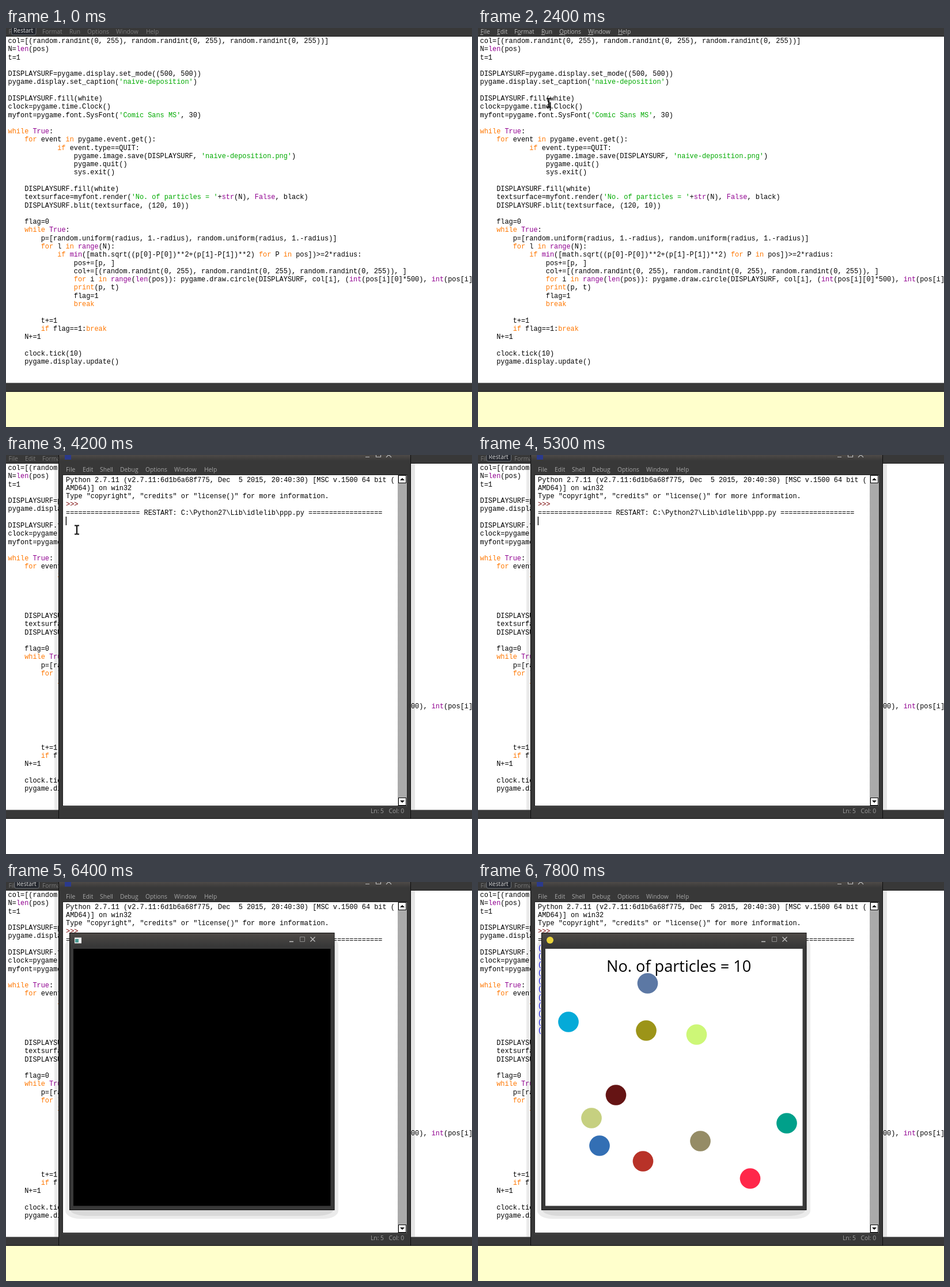
An HTML page that plays this animation: 809x693 px, repeating every 8 s.

```html
<!DOCTYPE html>
<html lang="en">
<head>
<meta charset="utf-8">
<title>Naive deposition</title>
<style>
html, body { margin: 0; width: 100%; height: 100%; overflow: hidden; background: #fff; }
svg { display: block; width: 100vw; height: 100vh; }
text { white-space: pre; }
.code { font: 11.9px "Liberation Mono", "Courier New", monospace; fill: #000; }
.ui { font: 10.3px "Open Sans", "Noto Sans", sans-serif; }
.key { fill: #ff7700; }
.fn { fill: #900090; }
.str { fill: #00aa00; }
.count { font: 27.1px "Comic Sans MS", "Open Sans", sans-serif; }
</style>
</head>
<body>
<svg id="stage" viewBox="0 0 809 693" preserveAspectRatio="none"></svg>
<script>
const LOOP = 8000, LINE = 14.28, SCALE = 0.8925;

const source = `col=[(random.randint(0, 255), random.randint(0, 255), random.randint(0, 255))]
N=len(pos)
t=1

DISPLAYSURF=pygame.display.set_mode((500, 500))
pygame.display.set_caption('naive-deposition')

DISPLAYSURF.fill(white)
clock=pygame.time.Clock()
myfont=pygame.font.SysFont('Comic Sans MS', 30)

while True:
    for event in pygame.event.get():
            if event.type==QUIT:
                pygame.image.save(DISPLAYSURF, 'naive-deposition.png')
                pygame.quit()
                sys.exit()

    DISPLAYSURF.fill(white)
    textsurface=myfont.render('No. of particles = '+str(N), False, black)
    DISPLAYSURF.blit(textsurface, (120, 10))

    flag=0
    while True:
        p=[random.uniform(radius, 1.-radius), random.uniform(radius, 1.-radius)]
        for l in range(N):
            if min([math.sqrt((p[0]-P[0])**2+(p[1]-P[1])**2) for P in pos])>=2*radius:
                pos+=[p, ]
                col+=[(random.randint(0, 255), random.randint(0, 255), random.randint(0, 255)), ]
                for i in range(len(pos)): pygame.draw.circle(DISPLAYSURF, col[i], (int(pos[i][0]*500), int(pos[i][1]*500)), 20)
                print(p, t)
                flag=1
                break

        t+=1
        if flag==1:break
    N+=1

    clock.tick(10)
    pygame.display.update()`.split("\n");

const banner = [
  "Python 2.7.11 (v2.7.11:6d1b6a68f775, Dec  5 2015, 20:40:30) [MSC v.1500 64 bit (",
  "AMD64)] on win32",
  'Type "copyright", "credits" or "license()" for more information.'
];
const rule = "=".repeat(18);
const restart = `${rule} RESTART: C:\\Python27\\Lib\\idlelib\\ppp.py ${rule}`;

// x, y, colour in the order of deposition
const particles = [
  [294.5, 176, "#5c78a4"], [239.5, 370, "#651414"], [386, 450, "#958c66"],
  [157, 243, "#05aad8"], [536, 419, "#00a08a"], [286.5, 485, "#b83228"],
  [379.5, 265, "#cdf777"], [211, 458, "#336fb4"], [292, 258, "#9c9418"],
  [472.5, 515, "#ff274a"], [197, 410, "#c6d080"]
];

const esc = s => s.replace(/&/g, "&amp;").replace(/</g, "&lt;").replace(/>/g, "&gt;");
const rect = (x, y, w, h, fill, more = "") =>
  `<rect x="${x}" y="${y}" width="${w}" height="${h}" fill="${fill}" ${more}/>`;
const path = (d, color, width = 1) =>
  `<path d="${d}" fill="none" stroke="${color}" stroke-width="${width}"/>`;
const label = (x, y, s, cls, more = "") => `<text x="${x}" y="${y}" class="${cls}" ${more}>${s}</text>`;
const group = (id, body) => `<g id="${id}">${body}</g>`;

const tokens = /('[^']*')|\b(while|for|in|if|break|print)\b|\b(True|False|len|str|range|min|int)\b/g;
const paint = s => esc(s).replace(tokens, (all, str, key) =>
  `<tspan class="${str ? "str" : key ? "key" : "fn"}">${all}</tspan>`);

const codeRow = (x, y, i, s, more) => label(x, Math.round(y + i * LINE), s, "code", more);
const shellRow = (i, s, more) => codeRow(104, 46.6, i, s, more);
const menu = (items, y) => items.map(([x, s]) => label(x, y, s, "ui")).join("");

function editor() {
  const items = [[4.5, "File"], [33, "Edit"], [63, "Format"], [110, "Run"],
    [141, "Options"], [191, "Window"], [243, "Help"]];
  const marks = [[4, 5], [33, 5], [69, 6], [110, 6], [141, 8], [191, 9], [243, 8]];
  return rect(0, 0, 809, 693, "#fff")
    + rect(0, 0, 809, 14, "#383838") + rect(0, 14, 809, 1, "#1c1c1c")
    + group("menu", menu(items, 10))
    + group("marks", marks.map(([x, w]) => rect(x, 11, w, 1, "#b8b8b8")).join(""))
    + source.map((s, i) => s && codeRow(3.6, 26, i, paint(s))).join("")
    + rect(124.6, 129, 1.8, 14.5, "#000", 'id="caret"')
    + rect(0, 616, 809, 1, "#8a8a8a") + rect(0, 617, 809, 14, "#383838")
    + rect(0, 631, 809, 1, "#141414")
    + rect(0, 632, 809, 61, "#ffffcc", 'id="floor"');
}

function scrollArrow(y, up) {
  const d = up ? `M684 ${y + 9}h8l-4-4z` : `M684 ${y + 5}h8l-4 4z`;
  return rect(681.5, y + .5, 13, 13, "#fff", 'stroke="#000"') + `<path d="${d}"/>`;
}

function shell() {
  const items = [[104, "File"], [133, "Edit"], [163, "Shell"], [198, "Debug"],
    [242, "Options"], [292, "Window"], [344, "Help"]];
  return rect(84, 15, 8, 601, "#000", 'opacity=".08"')
    + rect(702, 15, 8, 601, "#000", 'opacity=".1"')
    + rect(91.5, -5, 611, 636.5, "#383838", 'stroke="#0c0c0c"')
    + rect(92, 0, 610, 10, "url(#bar)")
    + rect(102, -3, 11, 11, "#2b3a8c")
    + path("M624 3.5h7M642.5-3v6.5h8v-6.5M660 4l4.5-4.5L669 4", "#bbb", 1.2)
    + `<g fill="#a6a6a6">${menu(items, 28.6)}</g>`
    + rect(98, 34, 599, 576, "#222") + rect(99, 35, 581, 574, "#fff")
    + rect(680, 35, 16, 574, "url(#mesh)")
    + scrollArrow(35, true) + scrollArrow(595, false)
    + path("M98 610.5h599", "#555")
    + label(633, 621.6, "", "ui", 'id="line" fill="#a0a0a0"')
    + label(664.5, 621.6, "Col: 0", "ui", 'fill="#a0a0a0"')
    + banner.map((s, i) => shellRow(i, esc(s))).join("")
    + shellRow(3, "&gt;&gt;&gt; ", 'style="fill:#770000"')
    + group("restart", shellRow(4, esc(restart)))
    + particles.map((p, i) => shellRow(5 + i,
        `([0.${p[0] * 1730 % 900000}, 0.${p[1] * 1510 % 900000}], ${i + 1})`, 'style="fill:#00f" data-row')).join("")
    + rect(131.5, 79, 1.8, 14.5, "#000", 'id="prompt"')
    + rect(103.7, 107, 1.4, 15, "#000", 'id="idle"');
}

function plot() {
  const r = 20 * SCALE;
  return `<g opacity=".08">${rect(103, 95, 474, 490, "#000", 'rx="26" ry="14"')}</g>`
    + rect(112, 560, 456, 20, "#000", 'rx="30" ry="14" opacity=".08"')
    + rect(110.5, 88.5, 459.5, 481, "#383838", 'stroke="#0a0a0a"')
    + rect(111, 89, 458.5, 22, "url(#bar)")
    + path("M492 103.5h7M528.5 95.5l8 8m0-8l-8 8", "#c4c4c4", 1.3)
    + path("M510.5 95.5h8v8h-8z", "#8c8c8c")
    + group("plainIcon", rect(119, 96.5, 12, 10, "#eee") + rect(120, 99, 6, 6, "#4a9a92"))
    + `<circle id="icon" cx="125" cy="101" r="6" fill="#e8d23c"/>`
    + rect(117, 116, 446.5, 446.5, "#000", 'id="canvas"')
    + label(223, 155.5, "", "count", 'id="count"')
    + particles.map(([x, y, c]) => `<circle data-dot="" cx="${x}" cy="${y}" r="${r}" fill="${c}"/>`).join("");
}

const $ = id => document.getElementById(id);
$("stage").innerHTML = `<defs>
  <linearGradient id="bar" x2="0" y2="1"><stop stop-color="#4e4a47"/><stop offset="1" stop-color="#383838"/></linearGradient>
  <pattern id="mesh" width="2" height="2" patternUnits="userSpaceOnUse">
    ${rect(0, 0, 2, 2, "#cfcfcf")}${rect(0, 0, 1, 1, "#858585")}${rect(1, 1, 1, 1, "#858585")}
  </pattern></defs>`
  + editor() + group("shell", shell()) + group("plot", plot())
  + group("tip", rect(9.5, -4.5, 42.5, 16.5, "#24272e", 'rx="3" stroke="#6e7278"')
      + label(13, 8.4, "Restart", "ui", 'fill="#d8d8d8"'))
  + group("mouse", path("M-4-7.5h3l1 1 1-1h3M-4 7.5h3l1-1 1 1h3M0-7v14", "#111", 2.2));

const rows = document.querySelectorAll("[data-row]");
const dots = document.querySelectorAll("[data-dot]");
const show = (el, on) => { el.style.display = on ? "" : "none"; };
const within = (t, a, b) => t >= a && t < b;
const blink = t => t % 900 < 600;
const fade = (t, start) => t < start ? 0 : t < start + 100 ? .4 : t < start + 200 ? .8 : 1;

// Windows fade in while growing slightly about their centre
function reveal(id, t, start, cx, cy) {
  const o = fade(t, start), k = .94 + .06 * o;
  show($(id), o > 0);
  $(id).setAttribute("opacity", o);
  $(id).setAttribute("transform", o < 1 ? `translate(${cx * (1 - k)} ${cy * (1 - k)}) scale(${k})` : "");
}

function draw(now) {
  const t = Math.floor((now % LOOP) / 100) * 100;
  const active = within(t, 600, 3100);
  const caretOn = active && (t >= 2400 || blink(t - 600));

  $("menu").setAttribute("fill", active ? "#b8b8b8" : "#7c7c7c");
  show($("marks"), within(t, 900, 3100));
  show($("caret"), caretOn);
  $("floor").setAttribute("fill", active && !caretOn || within(t, 3100, 6200) ? "#fff" : "#ffffcc");

  reveal("shell", t, 3100, 397, 315);
  $("line").textContent = t < 3900 ? "Ln: 3" : "Ln: 5";
  show($("restart"), t >= 3900);
  show($("prompt"), t < 3900);
  show($("idle"), within(t, 4200, 6200) && blink(t - 4200));

  reveal("plot", t, 6200, 340, 329);
  const n = t < 6900 ? 0 : (t - 6800) / 100;
  show($("plainIcon"), !n);
  show($("icon"), n);
  $("canvas").setAttribute("fill", n ? "#fff" : "#000");
  $("count").textContent = n ? "No. of particles = " + Math.min(n, 10) : "";
  dots.forEach((d, i) => show(d, n && i <= n));
  rows.forEach((r, i) => show(r, n && i <= n));

  // The pointer comes down from the top left and later returns there
  const away = t < 600 ? 1 - (t - 100) / 500 : t < 5100 ? 0 : (t - 5000) / 300;
  const e = away * away * (3 - 2 * away);
  show($("mouse"), within(t, 100, 5300));
  $("mouse").setAttribute("transform", `translate(${123 - 95 * e} ${130 - 120 * e})`);
  show($("tip"), t < 100 || t >= 5300);
  $("tip").setAttribute("transform", t < 100 ? "" : "translate(5.5 -1)");
}

const begin = performance.now();
function tick() {
  draw(performance.now() - begin);
  requestAnimationFrame(tick);
}
tick();
</script>
</body>
</html>
```
